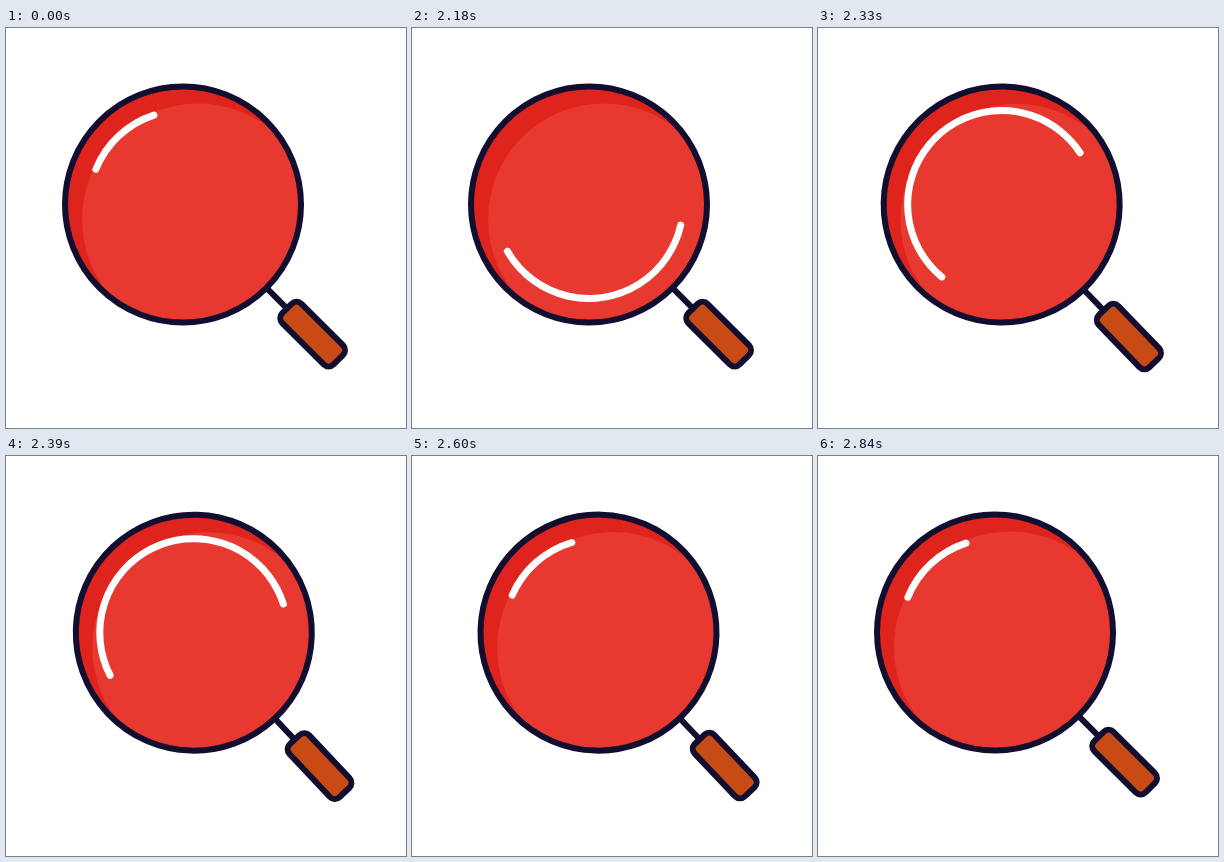
An HTML page with a canvas that plays this animation: 400 px wide and 400 px high, repeating every 2.9 s.

```html
<!DOCTYPE html>
<html lang="en">
<head>
<meta charset="utf-8">
<title>Magnifying glass</title>
<style>
  html, body { margin: 0; width: 100%; height: 100%; overflow: hidden; background: #fff; }
  canvas { display: block; width: 400px; height: 400px; }
</style>
</head>
<body>
<canvas id="stage" width="400" height="400"></canvas>
<script>
const ctx = document.getElementById('stage').getContext('2d');
const LOOP = 2900, START = 2030, STEP = 30;
const NAVY = '#110e2f', RED = '#e7392f', DARK_RED = '#df231d', ORANGE = '#c84b16';
const LENS = { x: 177, y: 176.5, r: 118 };
const PIVOT_Y = 541, SWAY = 13.4 / (PIVOT_Y - LENS.y);
const RAD = Math.PI / 180;

// smooth 0..1 ramp between times a and b
function ramp(t, a, b) {
  const u = Math.min(1, Math.max(0, (t - a) / (b - a)));
  return u * u * (3 - 2 * u);
}

function circle(x, y, r) {
  ctx.beginPath();
  ctx.arc(x, y, r, 0, 2 * Math.PI);
}

function drawHandle() {
  ctx.save();
  ctx.translate(LENS.x, LENS.y);
  ctx.rotate(45 * RAD);
  ctx.beginPath();
  ctx.moveTo(LENS.r, 0);
  ctx.lineTo(148, 0);
  ctx.stroke();
  ctx.beginPath();
  ctx.roundRect(147, -13.6, 72.6, 27.2, 7);
  ctx.fillStyle = ORANGE;
  ctx.fill();
  ctx.stroke();
  ctx.restore();
}

function drawLens() {
  const { x, y, r } = LENS;
  ctx.save();
  circle(x, y, r);
  ctx.fillStyle = DARK_RED;
  ctx.fill();
  ctx.clip();
  circle(x + 15, y + 15, 116);
  ctx.fillStyle = RED;
  ctx.fill();
  ctx.restore();
  circle(x, y, r);
  ctx.stroke();
}

// the glint makes two turns, stretching after the first and shrinking in the second
function drawGlint(t) {
  const first = ramp(t, 2004, 2316), second = ramp(t, 2360, 2576);
  const mid = 227 + 360 * (first + second);
  const half = (50 + 147 * (first - second)) / 2;
  ctx.beginPath();
  ctx.arc(LENS.x, LENS.y, 94, (mid - half) * RAD, (mid + half) * RAD);
  ctx.strokeStyle = '#fff';
  ctx.lineWidth = 7;
  ctx.stroke();
}

function draw(time) {
  const t = time < START ? 0 : START + Math.floor((time - START) / STEP) * STEP;
  const sway = SWAY * (ramp(t, 2194, 2467) - ramp(t, 2467, 2840));
  ctx.fillStyle = '#fff';
  ctx.fillRect(0, 0, 400, 400);
  ctx.save();
  ctx.translate(LENS.x, PIVOT_Y);
  ctx.rotate(sway);
  ctx.translate(-LENS.x, -PIVOT_Y);
  ctx.strokeStyle = NAVY;
  ctx.lineWidth = 6;
  ctx.lineCap = 'round';
  drawHandle();
  drawLens();
  drawGlint(t);
  ctx.restore();
}

const begin = performance.now();
function tick() {
  draw((performance.now() - begin) % LOOP);
  requestAnimationFrame(tick);
}
tick();
</script>
</body>
</html>
```
